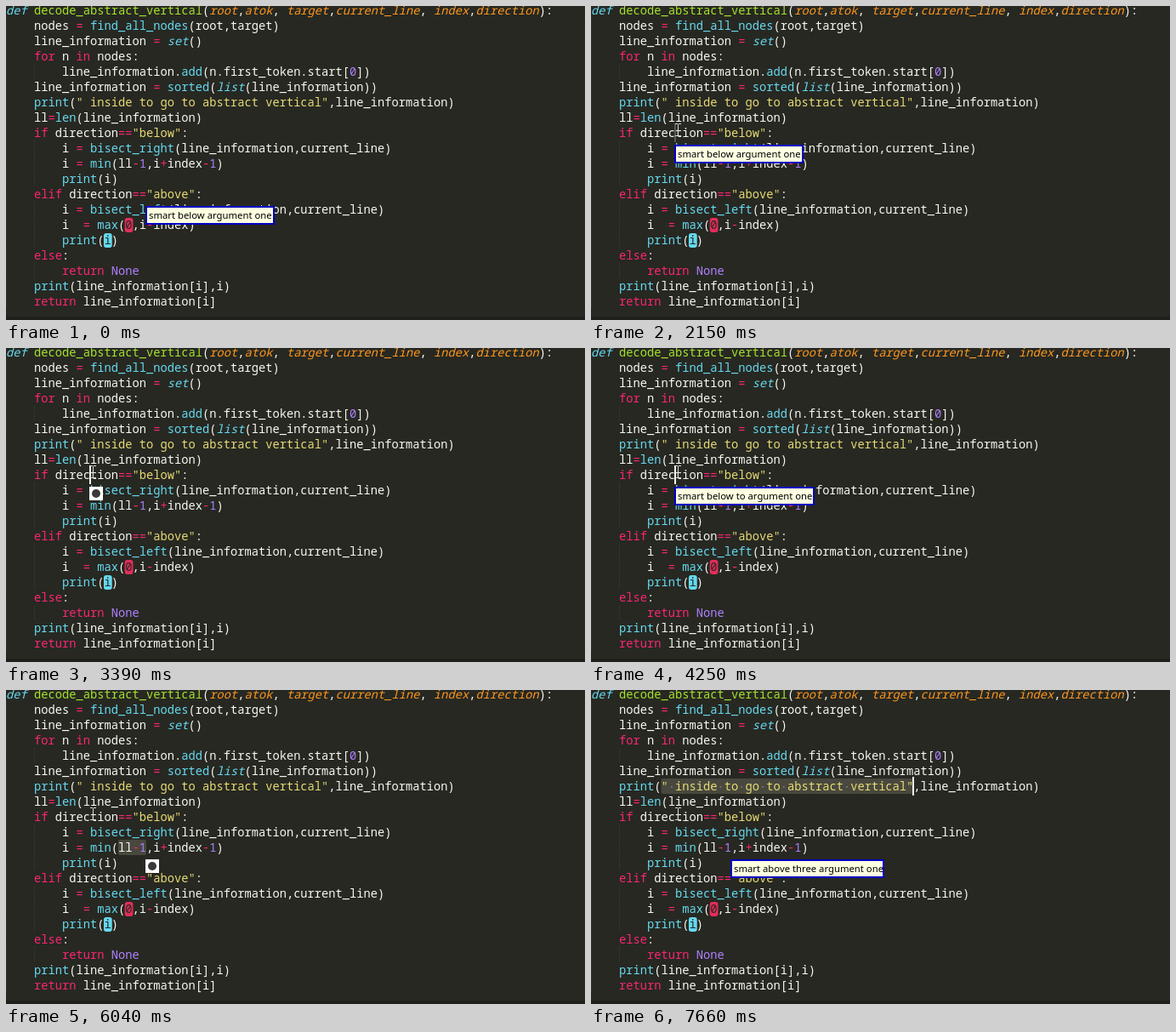
These frames come from a looping animation (681x369 px, 8 s). An HTML page with a canvas:

```html
<!DOCTYPE html>
<html lang="en">
<head>
<meta charset="utf-8">
<title>Voice editing in a code editor</title>
<style>
html, body { margin: 0; width: 100%; height: 100%; overflow: hidden; background: #272822; }
canvas { display: block; }
</style>
</head>
<body>
<canvas id="stage" width="681" height="369"></canvas>
<script>
const ctx = document.getElementById('stage').getContext('2d');
const LOOP = 8000, CHAR = 8.247, LINE = 18;
const CODE_FONT = '13.745px "Noto Sans Mono", monospace';
const TIP_FONT = '11.3px "Noto Sans", sans-serif';
const C = {
  bg: '#272822', fg: '#f8f8f2', pink: '#f92672', cyan: '#66d9ef', green: '#a6e22e',
  orange: '#fd971f', yellow: '#e6db74', purple: '#ae81ff', select: '#49483e', red: '#e22d5b'
};

const code = `def decode_abstract_vertical(root,atok, target,current_line, index,direction):
    nodes = find_all_nodes(root,target)
    line_information = set()
    for n in nodes:
        line_information.add(n.first_token.start[0])
    line_information = sorted(list(line_information))
    print(" inside to go to abstract vertical",line_information)
    ll=len(line_information)
    if direction=="below":
        i = bisect_right(line_information,current_line)
        i = min(ll-1,i+index-1)
        print(i)
    elif direction=="above":
        i = bisect_left(line_information,current_line)
        i  = max(0,i-index)
        print(i)
    else:
        return None
    print(line_information[i],i)
    return line_information[i]`.split('\n');

function style(word, row, rest) {
  if (word[0] === '"') return [C.yellow];
  if (word === 'def') return [C.cyan, true];
  if (/^(for|in|if|elif|else|return|[=+-]+)$/.test(word)) return [C.pink];
  if (/^(\d+|None)$/.test(word)) return [C.purple];
  if (/^\w/.test(word)) {
    if (row === 0) return rest[0] === '(' ? [C.green] : [C.orange, true];
    if (rest[0] === '(') return [C.cyan, word === 'set' || word === 'list'];
  }
  return [C.fg];
}

const tokens = code.flatMap((text, row) =>
  [...text.matchAll(/"[^"]*"|\w+|[=+-]+|[^\s\w]/g)].map(m => {
    const [color, italic] = style(m[0], row, text.slice(m.index + m[0].length));
    return { text: m[0], row, col: m.index, color, italic };
  }));

const rowTop = row => row * LINE - 4;

function drawChars(text, row, col, color, italic) {
  ctx.font = (italic ? 'italic ' : '') + CODE_FONT;
  ctx.fillStyle = color;
  for (let i = 0; i < text.length; i++) {
    ctx.fillText(text[i], (col + i) * CHAR, row * LINE + 10);
  }
}

function drawGuides() {
  ctx.fillStyle = '#3b3c35';
  code.forEach((text, row) => {
    const indent = text.search(/\S/);
    for (let col = 0; col < indent; col += 4) {
      for (let y = 0; y < LINE; y += 2) ctx.fillRect(Math.round(col * CHAR), rowTop(row) + y, 1, 1);
    }
  });
}

function drawMark(row, col, color) {
  ctx.fillStyle = color;
  ctx.beginPath();
  ctx.roundRect(col * CHAR - 0.5, rowTop(row) + 1, CHAR + 1.5, 17, 3);
  ctx.fill();
  drawChars(code[row][col], row, col, C.bg);
}

function drawSelection({ row, from, to }) {
  ctx.fillStyle = C.select;
  ctx.beginPath();
  ctx.roundRect(from * CHAR, rowTop(row), (to - from) * CHAR, LINE, 2);
  ctx.fill();
  ctx.fillStyle = '#85847a';
  for (let col = from; col < to; col++) {
    if (code[row][col] === ' ') ctx.fillRect((col + 0.5) * CHAR - 0.8, rowTop(row) + 9, 1.6, 1.6);
  }
}

function drawTip({ x, y, w, text }) {
  ctx.fillStyle = '#0000c4';
  ctx.fillRect(x, y, w, 22);
  ctx.fillStyle = '#ffffe1';
  ctx.fillRect(x + 2, y + 2, w - 4, 18);
  ctx.fillStyle = '#000';
  ctx.font = TIP_FONT;
  ctx.fillText(text, x + 4, y + 15);
}

function drawBadge({ x, y }) {
  ctx.fillStyle = '#fff';
  ctx.fillRect(x, y, 16, 16);
  ctx.fillStyle = '#3a3a3a';
  ctx.beginPath();
  ctx.arc(x + 8, y + 8, 5, 0, Math.PI * 2);
  ctx.fill();
}

function drawPointer([x, y]) {
  x = Math.round(x);
  y = Math.round(y);
  ctx.fillStyle = '#d8d8d4';
  ctx.fillRect(x, y - 6, 1, 13);
  for (const dy of [-7, 7]) {
    ctx.fillRect(x - 3, y + dy, 3, 1);
    ctx.fillRect(x + 1, y + dy, 3, 1);
  }
}

// Entries start with a time; the latest one reached applies.
const latest = (list, t) => list.filter(e => e.at <= t).pop();

const SHORT = 'smart below argument one', LONG = 'smart below to argument one';
const popups = [
  { at: 0, x: 164, y: 235, w: 152, text: SHORT },
  { at: 2150, x: 98, y: 163, w: 152, text: SHORT },
  { at: 2380, x: 98, y: 163 },
  { at: 4250, x: 98, y: 163, w: 165, text: LONG },
  { at: 5420, x: 164, y: 199, w: 165, text: LONG },
  { at: 5500, x: 164, y: 199 },
  { at: 7350, x: 164, y: 199, w: 181, text: 'smart above three argument one' }
];
const carets = [
  { at: 1220, row: 8, col: 12 },
  { at: 4400, row: 10, col: 20, from: 16, to: 20 },
  { at: 7580, row: 6, col: 46, from: 10, to: 46 }
];
// time, caret opacity
const blink = [
  [1220, 1], [1400, 1], [1690, 0], [2080, 0], [2380, 1], [2490, 1], [2700, 0],
  [3170, 0], [3390, 1], [3560, 1], [3790, 0], [4249, 0], [4250, 1], [4800, 1],
  [5040, 0], [5420, 0], [5640, 1], [5740, 1], [5960, 0], [6500, 0], [6820, 1],
  [6910, 1], [7200, 0], [7579, 0], [7580, 1]
];
// time, x, y
const path = [
  [70, 486, 313], [220, 380, 252], [400, 230, 172], [560, 130, 120], [680, 86, 105],
  [850, 92, 139], [1010, 92, 139], [1080, 99, 141], [1150, 107, 146], [1220, 102, 145]
];

function lerpKeys(keys, t) {
  const i = keys.findIndex(k => k[0] > t);
  if (i < 0) return keys[keys.length - 1].slice(1);
  const a = keys[i - 1], b = keys[i], p = (t - a[0]) / (b[0] - a[0]);
  return a.slice(1).map((v, n) => v + (b[n + 1] - v) * p);
}

function draw(t) {
  ctx.fillStyle = C.bg;
  ctx.fillRect(0, 0, 681, 369);
  ctx.fillStyle = '#1f201c';
  ctx.fillRect(0, 365, 681, 4);
  drawGuides();

  const caret = latest(carets, t);
  if (caret && caret.to) drawSelection(caret);
  for (const k of tokens) drawChars(k.text, k.row, k.col, k.color, k.italic);
  drawMark(14, 17, C.red);
  drawMark(15, 14, C.cyan);

  if (caret) {
    ctx.globalAlpha = lerpKeys(blink, t)[0];
    ctx.fillStyle = C.fg;
    ctx.fillRect(Math.round(caret.col * CHAR) - 1, rowTop(caret.row) - 2, 2, 22);
    ctx.globalAlpha = 1;
  }

  const popup = latest(popups, t);
  if (popup.text) drawTip(popup);
  else drawBadge(popup);
  if (t >= 70) drawPointer(lerpKeys(path, t));
}

const start = performance.now();
function tick() {
  draw((performance.now() - start) % LOOP);
  requestAnimationFrame(tick);
}
tick();
</script>
</body>
</html>
```
